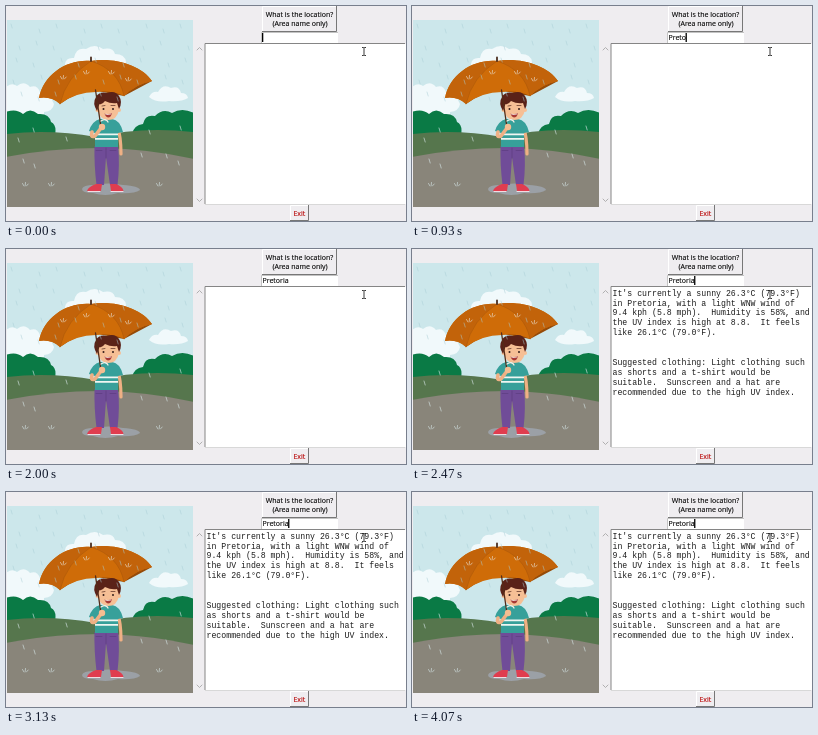
Write an HTML page that moves like this. It is 400 by 215 pixels and loops after 4.14 s.

```html
<!DOCTYPE html>
<html lang="en">
<head>
<meta charset="utf-8">
<title>Weather lookup</title>
<style>
html, body { margin: 0; width: 100%; height: 100%; overflow: hidden; background: #efedf0; }
svg { display: block; width: 400px; height: 215px; }
text { font: 7px "Open Sans", "Noto Sans", sans-serif; white-space: pre; stroke: currentColor; stroke-width: .12; }
#report text { font: 8.22px "Liberation Mono", "Courier New", monospace; fill: #1c1c1c; stroke: none; }
.line { fill: none; stroke-linecap: round; }
</style>
</head>
<body>
<svg id="stage" viewBox="0 0 400 215">
  <defs><clipPath id="frame"><rect x="1" y="14" width="186" height="187"/></clipPath></defs>

  <g clip-path="url(#frame)">
    <rect x="1" y="14" width="186" height="187" fill="#cce7eb"/>
    <g fill="#f1f9fb">
      <path d="M59 58Q60 51 68 52Q70 41 80 43Q89 37 97 43Q107 41 109 48Q119 48 120 56V60H59Z"/>
      <path d="M0 81Q6 76 11 80Q18 74 24 81Q31 78 34 86Q44 87 48 98Q47 105 38 106V112H0Z"/>
      <path d="M143 91Q146 85 152 86Q157 77 165 82Q173 79 175 87Q181 87 182 92Q175 96 163 95Q150 97 143 91Z"/>
    </g>
    <g fill="#0a7a45">
      <path d="M0 106Q10 102 17 108Q24 101 32 108Q43 107 45 116Q51 119 49 129L0 137Z"/>
      <path d="M126 128Q128 119 137 118Q139 108 149 110Q157 102 166 107Q176 101 188 107V133H126Z"/>
    </g>
    <path d="M0 128Q45 123 90 131Q135 120 188 126V160H0Z" fill="#56764d"/>
    <path d="M0 151Q45 142 95 142Q145 143 188 153V202H0Z" fill="#89857a"/>
    <path d="M76 183Q77 179 88 179Q103 176 117 179Q133 180 134 184Q128 188 112 187Q99 191 87 187Q76 187 76 183Z" fill="#9ba0a6"/>

    <path d="M54 98Q72 84 91 85L118 90L146 75L120 72L52 82Z" fill="#964b08"/>
    <path d="M85 55C61 53 38 68 33 92Q45 90 54 98Q70 86 90 86Q106 84 118 90Q130 78 146 75C136 60 109 51 85 55Z" fill="#cf6c08"/>
    <path d="M85 55C61 53 38 68 33 92Q45 90 54 98Q60 71 85 55ZM85 55Q113 64 118 90Q130 78 146 75C136 60 109 51 85 55Z" fill="#c2630a"/>
    <path d="M85 55Q60 71 54 98M85 55Q113 64 118 90" class="line" stroke="#a5540a" stroke-width=".5"/>
    <path d="M85 51.5V55" class="line" stroke="#4b2e20" stroke-width="1.8"/>

    <path d="M111 119Q115 130 115 148" class="line" stroke="#efb084" stroke-width="3.2"/>
    <path d="M88.5 140H112Q114 159 111.5 179H104L100 151L98 179H90.5Q88 158 88.5 140Z" fill="#704c98"/>
    <path d="M100 142V152M90 144.5H96M104 144.5H110" class="line" stroke="#5c3d80" stroke-width=".7"/>
    <path d="M90 178H96L95 185Q88 187 81 185Q82 181 90 178ZM104 178H110Q117 181 117.5 185Q111 187 105 185Z" fill="#e03d4f"/>
    <path d="M82 185.5H94M105 185.5H117" class="line" stroke="#f4eef0" stroke-width=".9"/>
    <path d="M94 113H106Q114 114 117 126L112 127V141H89V127L83 125Q86 115 94 113Z" fill="#37a09a"/>
    <path d="M89 127.5H112V129.3H89ZM89 132H112V133.8H89Z" fill="#eff6f2"/>
    <path d="M86 126Q84 132 89 130L95 122" class="line" stroke="#efb084" stroke-width="3.6" stroke-linejoin="round"/>

    <g fill="#f6bf95">
      <circle cx="91.5" cy="104" r="2"/><circle cx="113" cy="104" r="2"/>
      <path d="M92 94H113V104Q111 114 102 114Q93 113 92 104Z"/>
    </g>
    <path d="M91 105Q86 97 90 91Q93 85 101 87Q109 84 113 90Q117 96 113 103L111 97Q105 98 99 95Q96 99 93.5 98Z" fill="#5a2218"/>
    <path d="M96 100L99 99.5M105 99.5L109 99.5" class="line" stroke="#572b20" stroke-width=".7"/>
    <circle cx="97.5" cy="103" r="1" fill="#321c1a"/><circle cx="107" cy="103" r="1" fill="#321c1a"/>
    <path d="M98.5 107.5Q102 109 106 107Q105 111.5 102 111.5Q99.5 111 98.5 107.5Z" fill="#a63734"/>
    <path d="M99.5 108.2Q102 109.3 105 108" class="line" stroke="#fff" stroke-width=".7"/>

    <path d="M89.5 84L94.5 118" class="line" stroke="#542c18" stroke-width="1.3"/>
    <circle cx="96" cy="121" r="3.2" fill="#f5bd91"/>
    <path d="M95 115Q100 112 102 116" class="line" stroke="#f5f1e9" stroke-width="1.3"/>

    <path id="drizzle" class="line" stroke="#a9cdd5" stroke-width=".5"/>
    <path id="drops" class="line" stroke="#d3e2e2" stroke-width=".65"/>
    <path id="splashes" class="line" stroke="#eadfd0" stroke-width=".65"/>
  </g>

  <path d="M191 44L193.5 41.5L196 44M191 193L193.5 195.5L196 193" class="line" stroke="#aaa" stroke-width=".9"/>
  <rect x="199" y="38" width="201" height="160" fill="#fff"/>
  <path d="M199 198V37.5H399" fill="none" stroke="#858585"/>
  <path d="M199 198.5H399" fill="none" stroke="#d8d8d8"/>

  <g id="buttons"></g>
  <g text-anchor="middle">
    <text x="293.5" y="11">What is the location?</text>
    <text x="294" y="20">(Area name only)</text>
    <text x="293.3" y="210" fill="#b80000" color="#b80000">Exit</text>
  </g>
  <rect x="255" y="26" width="77" height="11" fill="#fff"/>
  <path d="M255.5 37V26.5H332" fill="none" stroke="#aaa" stroke-width=".7"/>
  <text id="entry" x="256.5" y="34.2"></text>
  <rect id="caret" y="27" width="1.3" height="9"/>
  <g id="report"></g>
  <path d="M356 41.5H357.5L358 42L358.5 41.5H360M358 42V49M356 49.5H357.5L358 49L358.5 49.5H360" fill="none" stroke="#222" stroke-width=".9"/>
</svg>
<script>
const LOOP = 4140, REPORT_AT = 2200;
const KEY_TIMES = [200, 330, 470, 730, 930, 1070, 1270, 1470];
const PLACE = "Pretoria";
const LINES = [
  "It's currently a sunny 26.3°C (79.3°F)",
  "in Pretoria, with a light WNW wind of",
  "9.4 kph (5.8 mph).  Humidity is 58%, and",
  "the UV index is high at 8.8.  It feels",
  "like 26.1°C (79.0°F).",
  "", "",
  "Suggested clothing: Light clothing such",
  "as shorts and a t-shirt would be",
  "suitable.  Sunscreen and a hat are",
  "recommended due to the high UV index."
];
const $ = id => document.getElementById(id);
const entry = $("entry"), caret = $("caret"), report = $("report");

const button = (x, y, w, h) => `
  <rect x="${x}" y="${y}" width="${w}" height="${h}" fill="#efedf0"/>
  <path d="M${x + .5} ${y + h}V${y + .5}H${x + w}" fill="none" stroke="#fff"/>
  <path d="M${x} ${y + h - .5}H${x + w - .5}V${y}" fill="none" stroke="#777"/>`;
$("buttons").innerHTML = button(256, 0, 75, 26) + button(284, 199, 19, 16);

report.innerHTML = LINES.map((line, i) =>
  `<text x="200.5" y="${46.6 + i * 9.9}">${line}</text>`).join("");

const drop = ([x, y]) => `M${x} ${y}l1.2 4`;
const splash = ([x, y]) => `M${x} ${y}l-1.5 -2.5M${x + 1.2} ${y - .5}l.3 -3M${x + 2.4} ${y}l1.8 -2`;
const sky = Array.from({ length: 42 }, (_, i) =>
  [5 + (i % 9) * 21 + (i * 7) % 11, 18 + Math.floor(i / 9) * 17 + (i * 5) % 10]);
$("drizzle").setAttribute("d", sky.map(drop).join(""));
$("drops").setAttribute("d", [
  [17, 153], [28, 158], [27, 122], [60, 131], [135, 147],
  [160, 148], [172, 155], [174, 120], [143, 124], [12, 132]
].map(drop).join("") + [[18, 180], [44, 180], [152, 180]].map(splash).join(""));
$("splashes").setAttribute("d",
  [[56, 73], [79, 68], [104, 68], [121, 75]].map(splash).join(""));

function caretVisible(t) {
  if (t < 1470) return t < 530 || t >= 730;
  return (t - 1300) % 900 < 600;
}

function draw(now) {
  const t = now % LOOP;
  entry.textContent = PLACE.slice(0, KEY_TIMES.filter(at => t >= at).length);
  caret.setAttribute("x", 256 + entry.getComputedTextLength());
  caret.style.display = caretVisible(t) ? "" : "none";
  report.style.display = t >= REPORT_AT ? "" : "none";
  requestAnimationFrame(draw);
}
requestAnimationFrame(draw);
</script>
</body>
</html>
```
